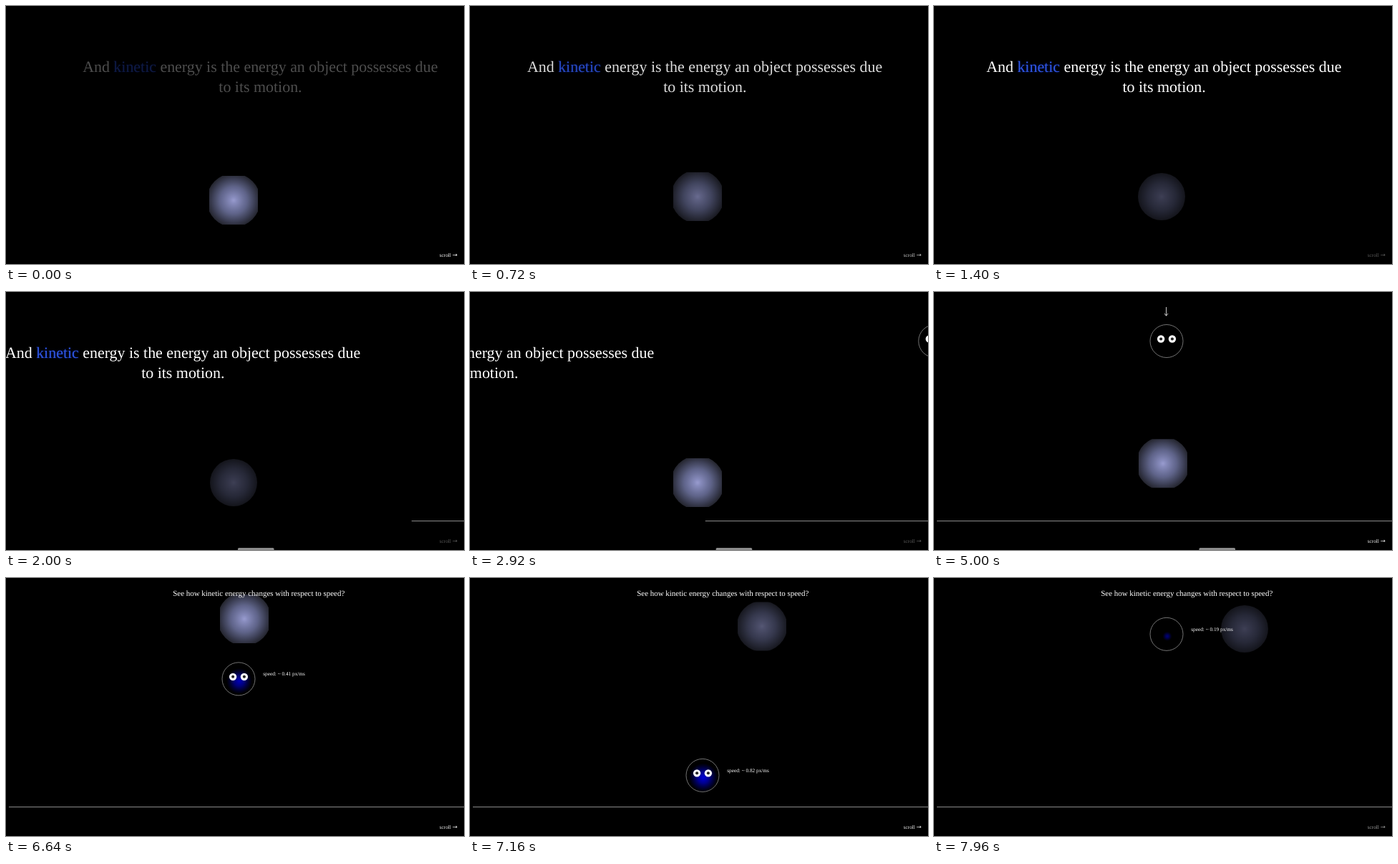
An HTML page that plays this animation: 640 by 360 pixels, repeating every 8000 ms.

```html
<!DOCTYPE html>
<html lang="en">
<head>
<meta charset="utf-8">
<title>Kinetic energy</title>
<style>
html, body { margin: 0; height: 100%; overflow: hidden; background: #000; }
svg { display: block; width: 100vw; height: 100vh; }
text {
  font-family: "Liberation Serif", "Times New Roman", serif;
  fill: #fff; text-rendering: geometricPrecision; white-space: pre;
}
.large { font-size: 21.92px; }
.medium { font-size: 10.96px; }
.small { font-size: 7.3px; }
.kinetic { fill: #2f58e6; filter: drop-shadow(0 0 1.5px #0a1870); }
.symbol { font-family: "DejaVu Sans", sans-serif; font-size: 8.5px; }
</style>
</head>
<body>
<svg viewBox="0 0 640 360">
  <defs>
    <radialGradient id="orbFill" gradientUnits="userSpaceOnUse" cx="0" cy="0" r="38">
      <stop offset="0" stop-color="#9c9fd4"/>
      <stop offset=".12" stop-color="#8a8ec0"/>
      <stop offset=".5" stop-color="#61668c"/>
      <stop offset="1" stop-color="#22232c"/>
    </radialGradient>
    <radialGradient id="energyFill">
      <stop offset="0" stop-color="#0000dc"/>
      <stop offset=".4" stop-color="#0000b0" stop-opacity=".8"/>
      <stop offset="1" stop-color="#000080" stop-opacity="0"/>
    </radialGradient>
    <clipPath id="orbBox"><rect x="-34" y="-34" width="68" height="68"/></clipPath>
  </defs>

  <g id="orb"><g clip-path="url(#orbBox)"><circle id="orbDisc" fill="url(#orbFill)"/></g></g>

  <g id="intro">
    <text class="large" x="-.8" y="92">And <tspan fill="none">kinetic</tspan> energy is the energy an object possesses due</text>
    <text class="large kinetic" x="42.4" y="92">kinetic</text>
    <text class="large" x="189.4" y="120.3">to its motion.</text>
  </g>

  <g id="scene">
    <path d="M4 319.5H1400" stroke="#8a8a8a"/>
    <path id="arrow" d="M324.5 21V33M322 30l2.5 3.3 2.5-3.3" fill="none" stroke="#ddd" stroke-width=".9"/>
    <g id="ball">
      <circle id="energy" cx="1" cy="3" fill="url(#energyFill)"/>
      <circle r="23" fill="none" stroke="#999" stroke-width=".75"/>
      <g id="eyes">
        <g id="eye">
          <circle cx="-7.9" r="5.2" fill="#fff"/>
          <circle cx="-7.9" r="2" fill="#111"/>
          <circle cx="-7.9" r=".6" fill="#777"/>
        </g>
        <use href="#eye" x="15.8"/>
      </g>
      <text id="speed" class="small" x="34.2" y="-4.6"></text>
    </g>
  </g>

  <text id="heading" class="medium" x="233.2" y="25.3">See how kinetic energy changes with respect to speed?</text>
  <text id="hint" class="small" x="605.7" y="350">scroll <tspan class="symbol">→</tspan></text>
  <rect id="scrollbar" y="357" width="50.5" height="4" rx="1.5" fill="#8c8c8c"/>
</svg>

<script>
const LOOP = 8000;
const REST_Y = 68.5, DROP_HEIGHT = 228;
const DROP_START = 6036, FALL_TIME = 1074;
const GRAVITY = 2 * DROP_HEIGHT / FALL_TIME ** 2;
const PAGE_SCALE = 2, READOUT_PHASE = 6555, READOUT_STEP = 99.2;

const el = id => document.getElementById(id);
const set = (id, attrs) => {
  for (const name in attrs) el(id).setAttribute(name, attrs[name]);
};
const clamp = (v, lo = 0, hi = 1) => Math.min(hi, Math.max(lo, v));
const progress = (t, start, end) => clamp((t - start) / (end - start));
const smooth = (t, start, end) => {
  const u = progress(t, start, end);
  return u * u * (3 - 2 * u);
};

// Smooth curve through [time, value] points, at rest at both ends.
function curve(t, points) {
  const time = clamp(t, points[0][0], points.at(-1)[0]);
  const i = Math.max(1, points.findIndex(p => p[0] >= time));
  const slope = k => k === 0 || k === points.length - 1 ? 0
    : (points[k + 1][1] - points[k - 1][1]) / (points[k + 1][0] - points[k - 1][0]);
  const [t0, v0] = points[i - 1], [t1, v1] = points[i];
  const span = t1 - t0, u = (time - t0) / span, w = 1 - u;
  return w * w * (1 + 2 * u) * v0 + u * u * (1 + 2 * w) * v1
    + u * w * span * (w * slope(i - 1) - u * slope(i));
}

const scrollPoints = [[1500, 637], [2000, 563], [2920, 325], [4080, 98], [5000, 0]];

// Time from the nearest top of the bounce.
function bounceTime(t) {
  const cycle = Math.max(0, t - DROP_START) % (2 * FALL_TIME);
  return Math.min(cycle, 2 * FALL_TIME - cycle);
}

function drawOrb(t) {
  const toBall = smooth(t, 4840, 5560), away = smooth(t, 6640, 7420);
  const x = 318 + 15 * toBall + 101 * away;
  const y = 271 - 5 * smooth(t, 0, 160) - 209 * toBall + 14 * away;
  const active = 1 - smooth(t, 0, 1400) + smooth(t, 2360, 2900) - smooth(t, 6640, 7420);
  set("orb", { transform: `translate(${x} ${y})`, opacity: .4 + .58 * active });
  set("orbDisc", { r: 33 + 4.5 * clamp(2 * active) });
}

function drawPage(t) {
  const scroll = curve(t, scrollPoints);
  const pending = (1 - progress(t, 0, 1300)) ** 2;
  set("intro", {
    transform: `translate(${scroll - 563 + 34 * pending})`,
    opacity: 1 - .7 * pending
  });
  set("scene", { transform: `translate(${scroll})` });
  set("scrollbar", {
    x: 324 + (563 - scroll) * .0826,
    opacity: progress(t, 1530, 1600) * (1 - progress(t, 5350, 5600))
  });
  set("arrow", { opacity: 1 - progress(t, 5800, 6100) });
  set("heading", { opacity: progress(t, 5800, 6500) });
  set("hint", {
    opacity: 1 - .65 * smooth(t, 300, 1400) + .6 * smooth(t, 4920, 5000)
      - .35 * smooth(t, 7400, 8000)
  });
}

function drawBall(t) {
  const fallen = bounceTime(t);
  const energy = fallen / FALL_TIME;
  set("ball", { transform: `translate(325 ${REST_Y + GRAVITY * fallen ** 2 / 2})` });
  set("energy", { r: clamp(32 * energy, 0, 20), opacity: clamp(.4 + .8 * energy) });
  set("eyes", { transform: `translate(0 -3) scale(1 ${1 - progress(t, 7860, 7940)})` });

  const tick = READOUT_PHASE + Math.floor((t - READOUT_PHASE) / READOUT_STEP) * READOUT_STEP;
  const speed = PAGE_SCALE * GRAVITY * bounceTime(tick);
  el("speed").textContent = `speed: ~ ${speed.toFixed(2)} px/ms`;
  set("speed", { opacity: t >= DROP_START ? 1 : 0 });
}

function draw(t) {
  drawOrb(t);
  drawPage(t);
  drawBall(t);
}

const start = performance.now();
function frame() {
  draw((performance.now() - start) % LOOP);
  requestAnimationFrame(frame);
}
draw(0);
requestAnimationFrame(frame);
</script>
</body>
</html>
```
